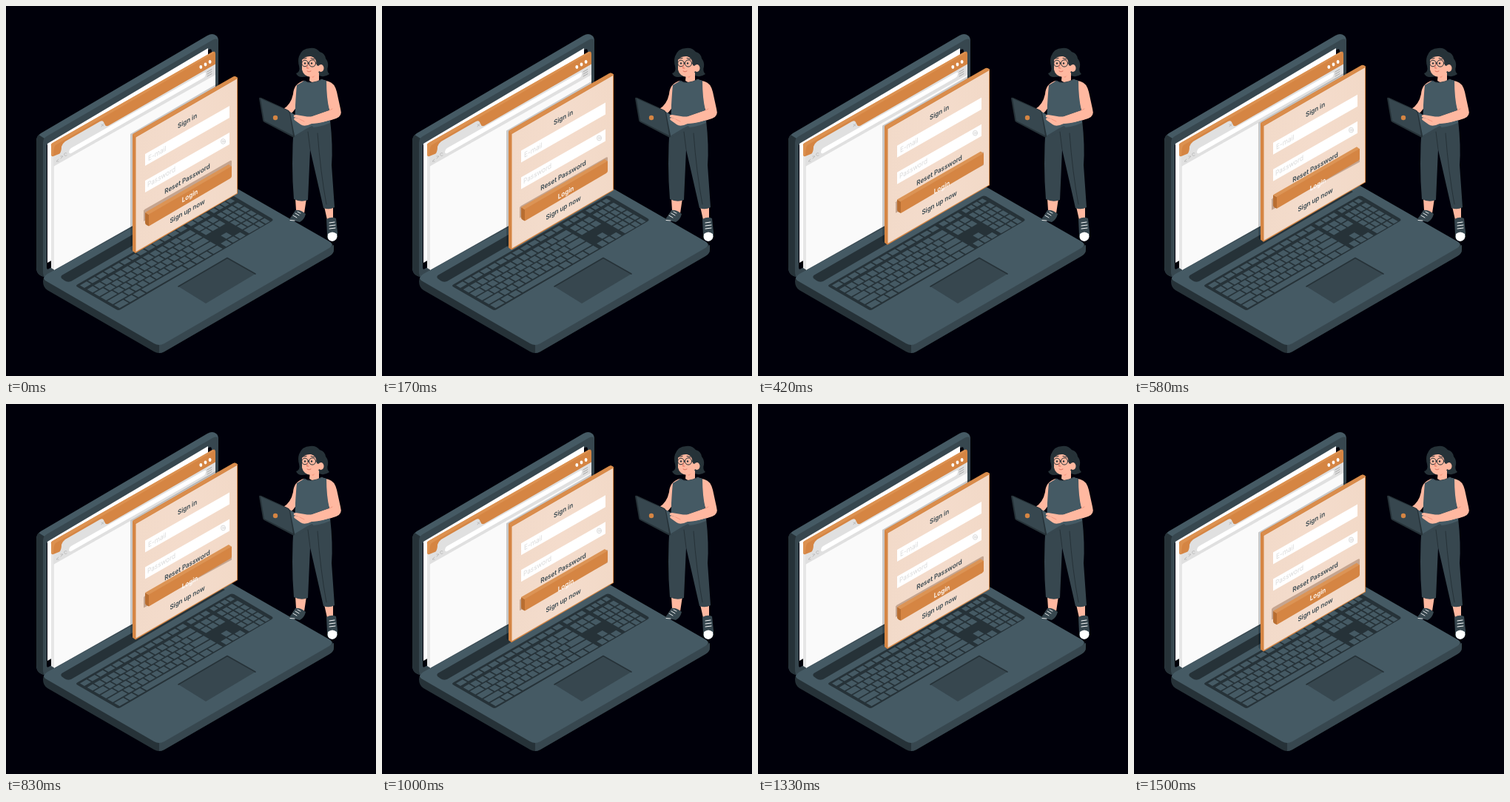
These frames come from a looping animation (500 by 500 pixels, 1.54 s). An HTML page:

```html
<!DOCTYPE html>
<html lang="en">
<head>
<meta charset="utf-8">
<title>Sign in</title>
<style>
html, body { margin: 0; width: 100%; height: 100%; overflow: hidden; background: #00000a; }
svg { display: block; width: 100vw; height: 100vh; }
text { font-family: Inter, Roboto, sans-serif; font-size: 9.2px; font-weight: 600; }
.mid { text-anchor: middle; fill: #37474f; }
.hint { fill: #d9d9d9; font-weight: 400; font-size: 9.5px; }
.line { fill: none; stroke-linecap: round; stroke-linejoin: round; }
</style>
</head>
<body>
<svg viewBox="0 0 500 500">
  <defs>
    <linearGradient id="peach">
      <stop offset="0" stop-color="#f2dac9"/>
      <stop offset=".5" stop-color="#f4dccc"/>
      <stop offset="1" stop-color="#f2d9c7"/>
    </linearGradient>
  </defs>

  <g id="lid">
    <path fill="#455a64" d="M41 183Q41 176 47 172L272 40Q279 36 284 40Q287 42 287 48V250L58 364Q51 368 45 363Q41 360 41 353Z"/>
    <path fill="#263238" d="M41 183Q41 177 44 174L52 179L51 184V366Q47 365 45 363Q41 360 41 353Z"/>
    <path fill="#37474f" d="M50 185Q50 179 55 176L279 46Q287 42 287 49V250L58 364Q54 366 52 365Q50 364 50 360Z"/>
    <path fill="#00000a" d="M55 188L274 59Q278 57 278 61V240L58 355Q55 357 55 353Z"/>
    <path fill="#fff" d="M56 186L273 57V224L56 347Z"/>
  </g>

  <g id="browser">
    <path fill="#e6e6e6" d="M61 188L66 191V357L61 354Z"/>
    <path fill="#fafafa" d="M65 203L283 78V234L65 357Z"/>
    <path fill="#e0e0e0" d="M64 203L283 77V93L64 217Z"/>
    <path fill="#d58543" d="M61 189Q60 187 63 185L279 62Q283 60 283 65V78.500L137 162.500L74 199L64 203Q61 204 61 200Z"/>
    <path fill="#dc9150" d="M61 188Q61 186 63 185L279 62L282 63L67 188Q64 190 64 203L61 201Z"/>
    <path fill="#e0e0e0" d="M68 206L73 199Q75 196 75 190Q76 186 80 183L127 156Q131 154 132 157L134 161Q135 163 138 162L138 167L70 207Z"/>
    <path fill="#fff" d="M88 192L268 90Q271 89 270 92Q270 95 267 97L88 199Q85 200 85 197Q85 194 88 192Z"/>
    <g fill="#fff">
      <ellipse cx="263.300" cy="82.500" rx="1.900" ry="2.400"/>
      <ellipse cx="269.500" cy="79" rx="1.900" ry="2.400"/>
      <ellipse cx="275.600" cy="75.500" rx="1.900" ry="2.400"/>
    </g>
    <path class="line" stroke="#a6a6a6" stroke-width="1" d="M272 89L278 85.500M272 92L278 88.500M272 95L278 91.500"/>
    <path class="line" stroke="#b5b5b5" stroke-width=".8" d="M129 160L132 162M132 159L129 163M71 207L68 210L71 210M74 206L77 203L74 203M82 199A2 2 0 1 0 82 202"/>
  </g>

  <g id="base">
    <path fill="#263238" d="M50 372Q50 366 56 363L290 234L434 317Q443 322 443 326V329Q443 335 437 338L214 467Q207 471 200 467L56 384Q50 380 50 372Z"/>
    <path fill="#37474f" d="M207 457L443 323V329Q443 335 437 338L214 467Q211 469 207 469Z"/>
    <path fill="#455a64" d="M53 371Q48 367 56 362L290 234L435 317Q445 322 437 327L214 456Q207 460 200 456Z"/>
    <path fill="#263238" d="M77 363L284 244L296 251L88 372Q83 374 79 371L75 368Q73 365 77 363Z"/>
    <path fill="#263238" d="M97 376L303 257Q305 256 308 257L359 287Q362 289 359 291L155 410Q152 412 149 410L97 380Q93 378 97 376Z"/>
    <path id="keys" fill="#455a64"/>
    <path fill="#37474f" d="M233 379L299 340L337 362L270 402Z"/>
    <path class="line" stroke="#263238" stroke-width="1.600" d="M233 379L299 340.500L337 362"/>
  </g>

  <g id="woman">
    <path fill="#263238" d="M396 68Q400 57 411 57Q419 56 424 62Q431 64 432 71Q436 76 435 82Q433 88 437 92Q430 97 423 94L400 96Q394 96 392 91Q398 89 396 81Q394 74 396 68Z"/>
    <path fill="#ffb8a0" d="M411 90H423V101Q418 107 410 101Z"/>
    <path fill="#f59b83" d="M411 95Q417 95 421 90L415 97Z"/>
    <path fill="#ffb8a0" d="M400 71Q406 64 421 69L425 80Q424 94 412 96Q402 95 400 86Z"/>
    <path fill="#263238" d="M399 74Q404 67 412 68Q419 69 420 80L424 82L429 72Q422 60 410 62Q400 64 399 74Z"/>
    <ellipse cx="425.500" cy="84" rx="4" ry="5" fill="#ffb8a0"/>
    <g class="line" stroke="#263238" stroke-width="1">
      <circle cx="404" cy="77.500" r="4.300"/>
      <circle cx="414" cy="77.500" r="4.600"/>
      <path d="M408.500 77H409.500M418.500 77L424 79M401 71L406 70.500M412 70.500L417 72"/>
      <path stroke="#d9705f" d="M407.500 79L406.500 84H409M407 88Q409 90 412 88"/>
    </g>
    <g fill="#263238"><circle cx="404" cy="77.500" r="1.200"/><circle cx="413" cy="77.500" r="1.200"/></g>

    <path fill="#ffb8a0" d="M391 260H406L403 280L392 276ZM430 271H442L442 289H434Z"/>
    <path fill="#37474f" d="M391 276Q398 275 405 281Q403 289 397 292Q390 290 384 290Q382 288 386 284Z"/>
    <path class="line" stroke="#fff" stroke-width=".9" d="M388 283L393 286M391 280L396 283M394 278L398 280M384 289.500L390 290"/>
    <path fill="#37474f" d="M433 288Q440 284 446 287L448 306Q449 317 441 318Q433 317 434 309Z"/>
    <path fill="#fff" d="M435 308Q441 303 447 308Q449 316 441 318Q433 317 435 308Z"/>
    <path class="line" stroke="#fff" stroke-width="1" d="M437 293L444 292M437 297L445 296M437 301L445 300"/>

    <path fill="#37474f" d="M389 160L438 154Q442 190 440 215L444 272Q437 276 429 273L411 194L408 262Q399 266 389 261Q385 215 389 160Z"/>
    <path class="line" stroke="#263238" stroke-width="1" d="M411 194L408 170M421 172Q425 225 433 268"/>
    <path fill="#ffb8a0" d="M402 101Q389 105 388 119Q385 133 375 139L384 147Q393 138 400 124Z"/>
    <path fill="#ffb8a0" d="M425 99L436 102Q444 104 447 116L452 139Q455 149 446 152Q429 158 413 159Q403 164 398 160L391 155Q387 152 391 151L398 153L389 150Q388 147 392 147L404 149Q410 150 414 149L437 141Q432 124 425 99Z"/>
    <path fill="#455a64" d="M403 101Q412 107 427 99L433 101Q433 124 437 141L414 149L404 160L389 163Q391 146 391 134Q392 116 393 107Z"/>
    <path fill="#455a64" d="M402 160L413 159Q427 158 438 154V158Q415 168 389 163Z"/>
    <path class="line" stroke="#37474f" stroke-width="1" d="M403 101Q412 107 427 99"/>

    <path fill="#37474f" d="M388 176L413 162Q417 163 414 166L391 178Z"/>
    <path fill="#455a64" d="M382 142L414 161L389 176Z"/>
    <path fill="#263238" d="M342 125Q342 123 345 124L380 140Q383 141 384 144L390 175Q390 179 387 177L349 157Q347 156 347 154Z"/>
    <path fill="#37474f" d="M344 125L380 141Q382 142 383 145L388 175L349 155Z"/>
    <circle cx="364" cy="151" r="3.200" fill="#d58543"/>
    <path fill="#ffb8a0" d="M437 141L447 151Q429 158 413 159Q403 164 398 160L391 155Q387 152 391 151L398 153L389 150Q388 147 392 147L404 149Q410 150 414 149Z"/>
    <path class="line" stroke="#f08f79" stroke-width=".8" d="M397 153L403 156M437 141L441 139"/>
  </g>

  <g id="panel">
    <path fill="#000" opacity=".2" d="M168 173L306 93L310 95V251L171 331L168 329Z"/>
    <path fill="#d58543" d="M171 174Q171 173 173 172L307 95.500Q309 94.500 311 95.500L313 97V253.500L175 334L171 331Z"/>
    <path fill="#da8d4c" d="M171 174L309 95L313 97L175 177Z"/>
    <path fill="url(#peach)" d="M175.500 177.500L312 98.500V253L175.500 332Z"/>
    <path fill="#fff" d="M188 200L302 135V151L188 216ZM188 236L302 171V187L188 252Z"/>
    <g class="line" stroke="#d3d3d3" stroke-width=".9">
      <ellipse cx="293.500" cy="183" rx="3" ry="3.400"/>
      <circle cx="293.500" cy="183" r="1.200"/>
    </g>
    <path fill="#c5a590" d="M186 276.500L188 274.500L303 209Q305 208 305 210V226L186 291Z"/>
    <g id="button">
      <path fill="#b86e31" d="M188 279L193 282V297.500L190 296Q188 295 188 293Z"/>
      <path fill="#dc9455" d="M188 279L301 214L305 217L193 282Z"/>
      <path fill="#d58543" d="M193 281.500L305 216.500V230Q305 231.500 303 233L193 297.500Z"/>
    </g>
    <g id="labels"></g>
  </g>
</svg>
<script>
const $ = id => document.getElementById(id);
const LOOP = 1540, FPS = 24;

// keyboard: u runs along the rows, v runs towards the user
const iso = (u, v) => `${(95 + u + v).toFixed(1)} ${(378 + 0.577 * (v - u)).toFixed(1)}`;
let keys = "";
function key(u, v, w, h = 7.4) {
  keys += `M${iso(u, v)}L${iso(u + w, v)}L${iso(u + w, v + h)}L${iso(u, v + h)}Z`;
}
function row(u0, u1, v, widths, h) {
  const scale = (u1 - u0) / widths.reduce((a, b) => a + b, 0);
  let u = u0;
  for (const w of widths) {
    key(u, v, w * scale - 1.8, h);
    u += w * scale;
  }
}
const same = n => Array(n).fill(1);
const rowV = i => 2 + i * 9.1 + (i ? 0.6 : 0);
const main = [
  same(13),
  [...same(13), 2],
  [1.5, ...same(12), 1.5],
  [1.8, ...same(11), 2.2],
  [2.3, ...same(10), 2.7],
  [1.5, 1.2, 1.2, 6, 1.2, 1.2, 1.2, 1.5]
];
main.forEach((widths, i) => row(3, 144, rowV(i), widths, i ? 7.4 : 6));
for (const i of [0, 1, 2]) row(147, 175, rowV(i), same(3), i ? 7.4 : 6);
key(156.3, rowV(4), 7.5);
row(147, 175, rowV(5), same(3));
for (let i = 0; i < 6; i++) row(178, 208, rowV(i), i < 5 ? same(4) : [2, 1, 1], i ? 7.4 : 6);
$("keys").setAttribute("d", keys);

const labels = [
  ["Sign in", 245, 158.3, "mid"],
  ["E-mail", 192, 209.5, "hint"],
  ["Password", 191, 245, "hint"],
  ["Reset Password", 245, 236.5, "mid"],
  ["Login", 248.5, 259.5, "mid", "#fff"],
  ["Sign up now", 245, 280.3, "mid"]
];
for (const [word, x, y, cls, color] of labels) {
  const el = document.createElementNS("http://www.w3.org/2000/svg", "text");
  el.textContent = word;
  el.setAttribute("class", cls);
  el.setAttribute("transform", `matrix(.866 -.5 0 1 ${x} ${y})`);
  if (color) el.style.fill = color;
  $("labels").append(el);
}

// panel height over time, joined by a smooth closed curve
const path = [[0, 0], [170, -4.6], [420, -11.4], [580, -15.3], [705, -16.9],
  [830, -15.6], [1080, -9.6], [1210, -6], [1500, 0.5]];
function point(i) {
  const n = path.length, turn = Math.floor(i / n), [t, y] = path[i - turn * n];
  return [t + turn * LOOP, y];
}
function slope(i) {
  const [t0, y0] = point(i - 1), [t1, y1] = point(i + 1);
  return (y1 - y0) / (t1 - t0);
}
function lift(t) {
  let i = path.length - 1;
  while (path[i][0] > t) i--;
  const [t0, y0] = point(i), [t1, y1] = point(i + 1);
  const d = t1 - t0, s = (t - t0) / d, r = 1 - s;
  return r * r * ((1 + 2 * s) * y0 + s * d * slope(i))
    + s * s * ((1 + 2 * r) * y1 - r * d * slope(i + 1));
}

function draw(ms) {
  const step = Math.floor((ms % LOOP + 5) * FPS / 1000) % 37;
  const y = lift(step * 1000 / FPS);
  $("panel").setAttribute("transform", `translate(0 ${y.toFixed(2)})`);
  $("button").setAttribute("transform", `translate(0 ${(y * 0.54).toFixed(2)})`);
}

let start;
function tick(now) {
  start ??= now;
  draw(now - start);
  requestAnimationFrame(tick);
}
draw(0);
requestAnimationFrame(tick);
</script>
</body>
</html>
```
